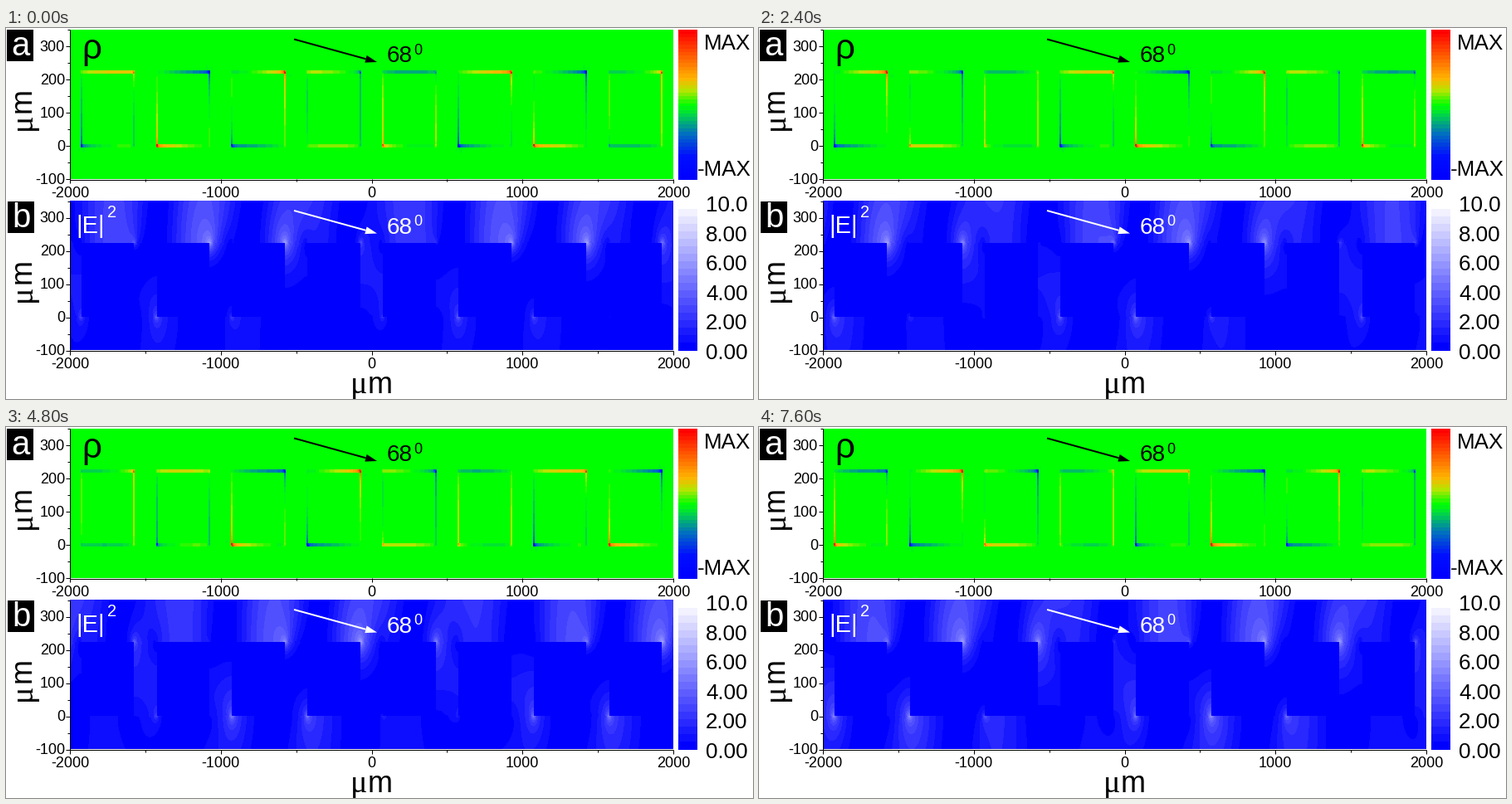
Write a matplotlib script that moves like this. It is 900x447 px and loops after 8 s.

```python
import numpy as np
import matplotlib.pyplot as plt
from matplotlib.animation import FuncAnimation
from matplotlib.colors import LinearSegmentedColormap
from matplotlib.patches import Polygon, Rectangle

W, H, DPI = 900, 447, 100
FRAMES, INTERVAL = 20, 400
DEG_PER_FRAME, PHASE0 = 10, 38

# Grating of metal bars, lengths in micrometres
PERIOD, SLIT, HEIGHT = 500.0, 150.0, 222.5
KX = np.radians(138) / PERIOD
K = KX / np.sin(np.radians(68))
COLS, ROWS = 727, 180
MODES, ORDERS = 8, 27
CHARGE_MAX = 4.5
INTENSITY, SATURATION = 2.6, 8.0


def solve_grating():
    """Complex Ex, Ey on the pixel grid for a plane wave on the bars."""
    n = np.arange(-ORDERS, ORDERS + 1)
    kn = KX + 2 * np.pi * n / PERIOD
    q = np.sqrt(K**2 - kn**2 + 0j)
    m = np.arange(MODES)
    alpha = m * np.pi / SLIT
    gamma = np.sqrt(K**2 - alpha**2 + 0j)

    def sinc(u):
        return np.sinc(u * SLIT / (2 * np.pi))

    turn = 1j**m
    overlap = SLIT / 2 * (turn * sinc(alpha - kn[:, None])
                          + turn.conj() * sinc(alpha + kn[:, None]))
    Y = K / PERIOD * overlap.conj().T @ (overlap / q[:, None])
    norm = np.diag(np.where(m == 0, SLIT, SLIT / 2))
    step = np.diag(np.exp(1j * gamma * HEIGHT))
    Yg = Y @ np.diag(gamma / K)
    system = np.block([[norm + Yg, (norm - Yg) @ step],
                       [(norm - Yg) @ step, norm + Yg]])
    drive = np.concatenate([2 * overlap[ORDERS].conj(), np.zeros(MODES)])
    down, up = np.split(np.linalg.solve(system, drive), 2)
    e = np.diag(step)
    mouth_top = gamma / K * (down - up * e)
    mouth_low = gamma / K * (down * e - up)
    incident = (n == 0).astype(float)
    smooth = np.sinc(n / (ORDERS + 1))
    R = (incident - K / (q * PERIOD) * (overlap @ mouth_top)) * smooth
    T = K / (q * PERIOD) * (overlap @ mouth_low) * smooth
    slit_smooth = np.sinc(m * PERIOD / (2 * SLIT) / (ORDERS + 1))
    down, up = down * slit_smooth, up * slit_smooth

    x = -1000 + (np.arange(COLS) + 0.5) * 4000 / COLS
    y = 350 - (np.arange(ROWS) + 0.5) * 2.5
    Ex = np.zeros((ROWS, COLS), complex)
    Ey = np.zeros_like(Ex)
    wave = np.exp(1j * np.outer(kn, x))

    above, below = y > HEIGHT, y < 0
    inside = ~above & ~below
    ya = y[above][:, None] - HEIGHT
    arriving, leaving = incident * np.exp(-1j * q * ya * incident), R * np.exp(1j * q * ya)
    Ex[above] = (q / K * (arriving - leaving)) @ wave
    Ey[above] = (kn / K * (arriving + leaving)) @ wave
    passed = T * np.exp(-1j * q * y[below][:, None])
    Ex[below] = (q / K * passed) @ wave
    Ey[below] = (kn / K * passed) @ wave

    cell = np.round(x / PERIOD)
    local = x - cell * PERIOD
    opening = (np.abs(local) < SLIT / 2) * np.exp(1j * KX * PERIOD * cell)
    angle = np.outer(alpha, local + SLIT / 2)
    yi = y[inside][:, None]
    a = down * np.exp(-1j * gamma * (yi - HEIGHT))
    b = up * np.exp(1j * gamma * yi)
    Ex[inside] = (gamma / K * (a - b)) @ (np.cos(angle) * opening)
    Ey[inside] = (1j * alpha / K * (a + b)) @ (np.sin(angle) * opening)
    at_mouth = np.minimum(np.abs(y - HEIGHT), np.abs(y)) < 7.5
    mouth = at_mouth[:, None] & (np.abs(local) < SLIT / 2 - 5)
    return Ex, Ey, y, mouth


def spread(field, s, axis):
    """Difference between the neighbours s pixels ahead and behind."""
    f = np.pad(field, s, mode="edge")
    f = f[s:-s] if axis == 1 else f[:, s:-s]
    return f[:, 2 * s:] - f[:, :-2 * s] if axis == 1 else f[2 * s:] - f[:-2 * s]


EX, EY, Y_GRID, MOUTH = solve_grating()
CHARGE = np.where(MOUTH, 0, spread(EX, 1, 1) - spread(EY, 2, 0))
DEPTH = np.clip((HEIGHT - Y_GRID) / HEIGHT, 0, 1)[:, None]


def charge_at(turn):
    v = np.real(CHARGE * turn)
    return np.where((v < -0.018) & (v > -0.15), -0.22, v)


def intensity_at(turn, i):
    loss = 0.5 - 0.3 * i / (FRAMES - 1)
    amp = 1 - loss * DEPTH
    v = INTENSITY * amp**2 * (np.real(EX * turn)**2 + np.real(EY * turn)**2)
    return v / (1 + v / SATURATION)


plt.rcParams["font.family"] = "Liberation Sans"
fig = plt.figure(figsize=(W / DPI, H / DPI), dpi=DPI, facecolor="white")
ax = fig.add_axes([0, 0, 1, 1])
ax.axis("off")

charge_map = LinearSegmentedColormap.from_list("charge", [
    (0, "#0000ff"), (0.15, "#0010ff"), (0.3, "#0070c0"), (0.42, "#00d050"),
    (0.47, "#00f41a"), (0.5, "#00ff00"), (0.6, "#b4e600"), (0.68, "#ffb400"),
    (0.82, "#ff6400"), (1, "#ff0000")], N=41)
field_map = LinearSegmentedColormap.from_list("field", ["#0000ff", "#ffffff"], N=20)


def panel(data, box, cmap, low, high):
    return ax.imshow(data, extent=box, cmap=cmap, vmin=low, vmax=high,
                     interpolation="nearest", aspect="auto")


def text(x, y, s, px, color="black", ha="left", **kw):
    ax.text(x, y, s, fontsize=px * 72 / DPI, color=color, ha=ha,
            va="baseline", **kw)


def line(xs, ys, color="black", width=1):
    ax.plot(xs, ys, color=color, lw=width * 72 / DPI, solid_capstyle="butt")


def micrometre(x, y, dx, dy, angle):
    turned = dict(rotation=angle, rotation_mode="anchor")
    text(x, y, "μ", 38, family="Liberation Serif", **turned)
    text(x + dx, y + dy, "m", 36, **turned)


def axes_marks(top, bottom):
    for v in range(-100, 351, 50):
        y = bottom - (v + 100) * 0.4
        major = v % 100 == 0
        line([72 if major else 74, 77], [y, y])
        if major:
            text(71, y + 6, str(v), 18, ha="right")
    for v in range(-2000, 2001, 500):
        x = 77 + (v + 2000) * 727 / 4000
        major = v % 1000 == 0
        line([x, x], [bottom, bottom + (5 if major else 3)])
        if major:
            text(x, bottom + 22, str(v), 18, ha="center")
    line([77, 77], [top, bottom + 0.5])
    line([77, 804], [bottom + 0.5, bottom + 0.5])
    micrometre(30, (top + bottom) / 2 + 31, 0, -21, 90)


def arrow(dy, color):
    start, tip = np.array([347, 13.5 + dy]), np.array([447, 41 + dy])
    u = (tip - start) / np.hypot(*(tip - start))
    side = np.array([-u[1], u[0]]) * 4.5
    neck = tip - 14 * u
    line([start[0], neck[0]], [start[1], neck[1]], color, 2)
    ax.add_patch(Polygon([tip, neck + side, neck - side], color=color, lw=0))
    text(459, 41 + dy, "68", 28, color)
    text(491, 32 + dy, "0", 18, color)


def badge(x, y, letter):
    ax.add_patch(Rectangle((x, y), 32, 38, color="black", lw=0))
    text(x + 16, y + 31, letter, 40, "white", "center")


charge_img = panel(charge_at(1), (77, 804, 182, 2), charge_map, -CHARGE_MAX, CHARGE_MAX)
field_img = panel(intensity_at(1, 0), (77, 804, 388.5, 208.5), field_map, 0, 10)
ramp = np.linspace(1, 0, 182)[:, None]
panel(ramp, (810, 833, 183, 2), charge_map, 0, 1)
panel(ramp, (810, 833, 389, 208), field_map, 0, 1)

axes_marks(2, 182)
axes_marks(208.5, 388.5)
micrometre(415, 440, 21, 0, 0)
badge(1, 2, "a")
badge(2, 209, "b")
text(91, 37, "ρ", 42)
text(84, 247, "|E|", 29, "white")
text(122, 228, "2", 20, "white")
arrow(0, "black")
arrow(206.5, "white")
text(841, 26, "MAX", 26)
text(833, 178, "-MAX", 26)
for i, label in enumerate(["10.0", "8.00", "6.00", "4.00", "2.00", "0.00"]):
    text(843, 221 + 35.6 * i, label, 26)

ax.set_xlim(0, W)
ax.set_ylim(H, 0)


def draw(i):
    turn = -np.exp(-1j * np.radians(DEG_PER_FRAME * i - PHASE0))
    charge_img.set_data(charge_at(turn))
    field_img.set_data(intensity_at(turn, i))
    return charge_img, field_img


anim = FuncAnimation(fig, draw, frames=FRAMES, interval=INTERVAL,
                     repeat=True, repeat_delay=0)
plt.show()
```
